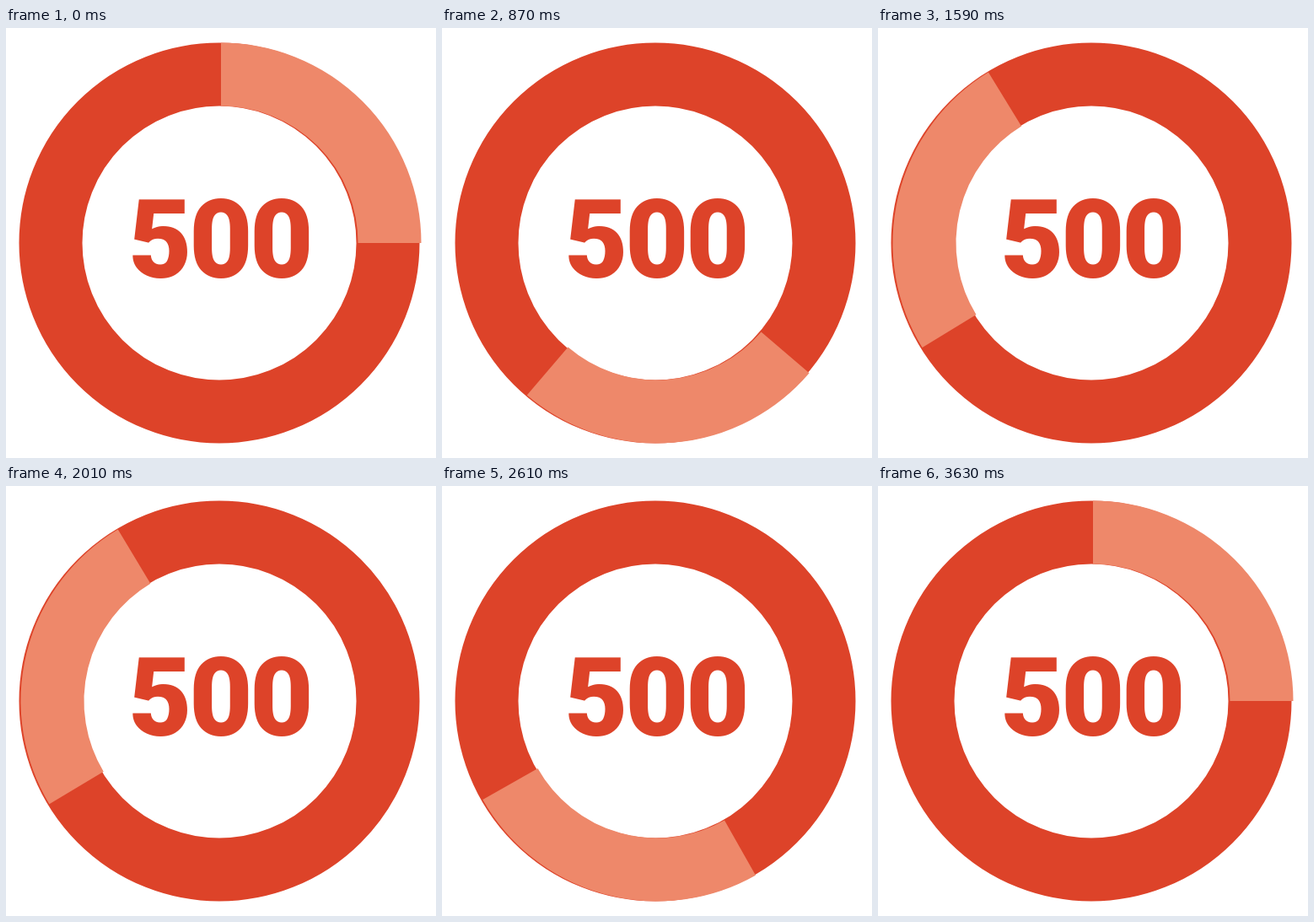
These frames come from a looping animation (510x510 px, 3.66 s). An HTML page:

```html
<!DOCTYPE html>
<html lang="en">
<head>
<meta charset="utf-8">
<title>Ring loader</title>
<style>
  html, body { margin: 0; width: 100%; height: 100%; overflow: hidden; background: #fff; }
  svg { display: block; width: 510px; height: 510px; }
  circle, path { fill: none; stroke-width: 75; }
  circle { stroke: #dd4329; }
  path { stroke: #ee886a; }
  text { font: 900 130px Roboto, sans-serif; fill: #dd4329; text-anchor: middle; }
</style>
</head>
<body>
<svg viewBox="0 0 510 510">
  <circle cx="253" cy="255" r="200"/>
  <path id="sector" d="M255 55A200 200 0 0 1 455 255"/>
  <text x="183 255 327" y="296">500</text>
</svg>
<script>
  const LOOP = 3660, STEP = 30, TURN = 1800, END = 3630, SWEEP = 270;
  const sector = document.getElementById('sector');

  // Constant speed out to SWEEP, then constant speed back.
  function angleAt(t) {
    return SWEEP * (t < TURN ? t / TURN : (END - t) / (END - TURN));
  }

  function draw() {
    const t = Math.floor(performance.now() % LOOP / STEP) * STEP;
    sector.setAttribute('transform', `rotate(${angleAt(t)} 255 255)`);
    requestAnimationFrame(draw);
  }
  draw();
</script>
</body>
</html>
```
